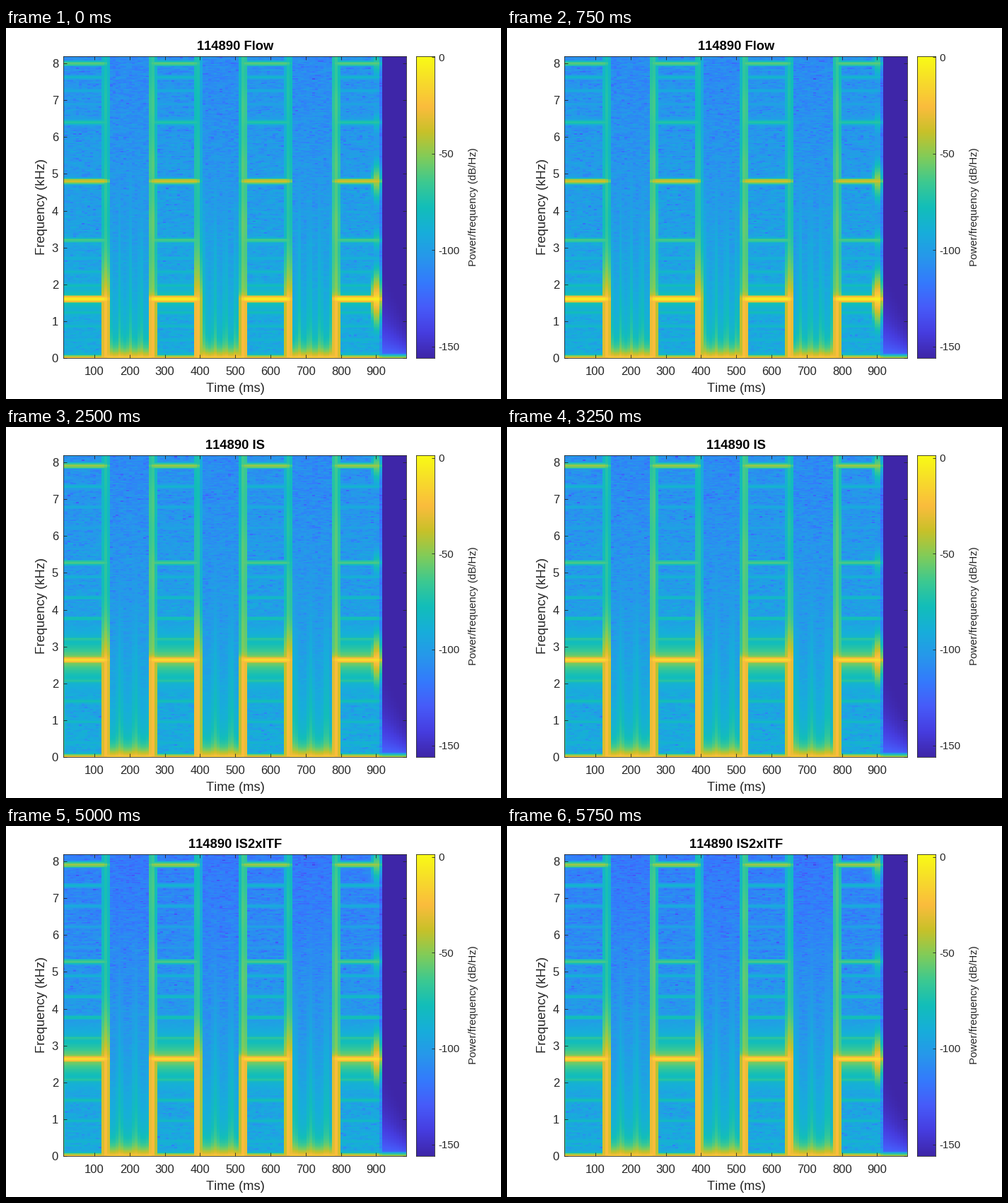
These frames come from a looping animation (700 by 525 pixels, 6250 ms). A matplotlib script:

```python
import numpy as np
import matplotlib.pyplot as plt
from matplotlib.animation import FuncAnimation
from matplotlib.colors import LinearSegmentedColormap

W, H, DPI = 700, 525, 100
INK = "#262626"
plt.rcParams.update({
    "font.family": "Liberation Sans", "text.kerning_factor": 6,
    "text.color": INK, "axes.edgecolor": INK,
    "xtick.color": INK, "ytick.color": INK, "axes.linewidth": 0.6,
})
PARULA = LinearSegmentedColormap.from_list("parula", [
    "#3e26a8", "#463de0", "#475bf9", "#347afd", "#2797eb", "#17aeda",
    "#12beb9", "#3dc990", "#81cc59", "#c8c129", "#fbbc3d", "#f7db2b",
    "#f9fb15"])

COLS, ROWS = 123, 257
FMAX, VMIN = 8.192, -156
T0, T1 = 11.6, 985.4
DT, DF = (T1 - T0) / (COLS - 1), FMAX / (ROWS - 1)
k = np.arange(COLS)[None, :]
f = np.arange(ROWS)[:, None] * DF
xpix = 81 + 485 / (COLS - 1) * k

EVENT = np.arange(6)
SWITCH = 15 + 16.3 * EVENT + 0.4 * (EVENT % 2)   # tone goes off, on, off...
LAST = 113                                       # last column with signal
HALF = 1.6                                       # half window, in columns


def power(db):
    return 10 ** (np.asarray(db) / 10)


def window(center):
    """Hamming weight of an event in each column, as power."""
    d = np.abs(k - center)
    return np.where(d < HALF, 0.54 + 0.46 * np.cos(np.pi * d / HALF), 0) ** 2


def step(d):
    return 0.5 + 0.5 * np.sin(np.pi * np.clip(d / (2 * HALF), -0.5, 0.5))


def tone_gate():
    edges = np.concatenate([[-9], SWITCH, [LAST - 0.4]])
    return sum(step(k - a) * step(b - k)
               for a, b in zip(edges[::2], edges[1::2]))


GATE = tone_gate()
GAP = (k > SWITCH[0]) & (k < SWITCH[-1]) & (GATE < 0.5)


def lobe(freq, level):
    return power(level - 6 * ((f - freq) / DF) ** 2)


def side_tones(freq, level, gap):
    return sum(lobe(freq + s * n * gap, level - 6 * n)
               for n in range(1, 5) for s in (-1, 1))


def click(main, starts, rng):
    """Flat up to the main tone, then an exponential drop and a slope."""
    x = np.maximum(f - main - 0.05, 0)
    drop, tau, slope = (29, 0.1, 2) if starts else (45, rng.uniform(.7, 1), .8)
    bead = 2 * np.sin(rng.uniform(2, 4) * x)
    return power(-25 - drop * (1 - np.exp(-x / tau)) - slope * x + bead)


def speckle(rng):
    z = rng.normal(size=(2, ROWS, COLS + 2))
    z = z[..., :-2] / 2 + z[..., 1:-1] + z[..., 2:] / 2
    return 0.8 * (10 * np.log10((z ** 2).sum(0) / 3) + 1.5)


def spectrogram(seed, main, peak, skirt, overtones, side, gap, phase, pitch,
                slope=1.7, onset=False):
    rng = np.random.default_rng(seed)
    tones = [(main, peak)] + [(main * n, lv) for n, lv in overtones]

    # noise floor, faintly banded while the tone sounds
    bands = rng.normal(0, 1.2, (ROWS, 1))
    level = -92 - slope * f + bands * GATE - 3 * (1 - GATE)
    total = power(level + speckle(rng))

    # tones with their side tones and the skirt of the loudest one
    sound = power(peak - skirt - 70 * np.sqrt(np.abs(f - main)))
    sound = sound + sum(lobe(*t) for t in tones)
    sound = sound + side_tones(main, side, gap)
    sound = sound + side_tones(tones[-1][0], -78, gap)
    total = total + sound * GATE ** 2

    # clicks where the tone toggles
    for i, c in enumerate(SWITCH):
        total = total + click(main, i % 2, rng) * window(c)

    # low rumble with striped columns between the tones
    rumble = -17 - 65 * (1 - np.exp(-f / 0.25)) - 8 * f
    stripe = np.cos(np.pi * (xpix - phase) / pitch) ** 4
    lift = 15 * (1 - np.exp(-f / 0.2)) * stripe
    total = total + GAP * power(rumble + lift) + lobe(0, -28)
    if onset:
        total = total + (k == 0) * (f < main) * power(-68)

    # flare where the signal is cut off, then the decaying tail
    for freq, lv in tones:
        total = total + power(lv - 4 - 80 * np.abs(f - freq)) * window(111.6)
    total = np.where(k == LAST, total * power(-12), total)
    reach = 0.9 - 0.06 * np.clip(k - LAST, 0, 9)
    tail = power(-120 - 38 * (1 - np.exp(-f / reach))) + lobe(0, -45)
    return 10 * np.log10(np.where(k > LAST, tail, total))


def low_tone(seed):
    return spectrogram(seed, 1.6, -4, 48,
                       [(2, -63), (3, -37), (4, -70), (5, -60)],
                       side=-71, gap=0.37, phase=161, pitch=14.9)


def high_tone(seed, phase, slope=1.7):
    return spectrogram(seed, 2.637, -11, 20, [(2, -62), (3, -47)],
                       side=-63, gap=0.5625, phase=phase, pitch=22.45,
                       slope=slope, onset=True)


SCENES = [
    ("Flow", 0.4, low_tone(1)),
    ("GT", 1.3, high_tone(2, 171)),
    ("IS", 1.3, high_tone(3, 161)),
    ("IS2", 1.3, high_tone(4, 167)),
    ("IS2xITF", 1.3, high_tone(5, 161, slope=2.7)),
]

fig = plt.figure(figsize=(W / DPI, H / DPI), dpi=DPI, facecolor="white")


def box(x0, y0, x1, y1):
    return fig.add_axes([x0 / W, 1 - y1 / H, (x1 - x0) / W, (y1 - y0) / H])


def label(x, y, text, px, **kw):
    return fig.text(x / W, 1 - y / H, text, fontsize=px * 72 / DPI,
                    ha="center", va="baseline", rotation_mode="anchor", **kw)


def picture(axes, data, extent):
    return axes.imshow(data, cmap=PARULA, origin="lower", aspect="auto",
                       interpolation="nearest", extent=extent)


ax = box(81, 40, 566, 467)
im = picture(ax, SCENES[0][2],
             (T0 - DT / 2, T1 + DT / 2, -DF / 2, FMAX + DF / 2))
ax.set(xlim=(T0, T1), ylim=(0, FMAX),
       xticks=range(100, 1000, 100), yticks=range(9))
ax.tick_params(direction="in", top=True, right=True, length=3.5, width=0.6,
               labelsize=12)
ax.tick_params(axis="x", pad=8.6)
ax.tick_params(axis="y", pad=5)

cax = box(580, 40, 606, 467)
bar = picture(cax, np.linspace(0, 1, 256)[:, None], (0, 1, VMIN, 0))
cax.set_xticks([])
cax.yaxis.tick_right()
cax.set_yticks(range(-150, 1, 50), [str(v) for v in range(-150, 1, 50)])
cax.tick_params(direction="in", length=3, width=0.6, pad=4, labelsize=10.8)

title = label(324, 31, "", 18.33, fontweight="bold", color="black")
label(324, 515, "Time (ms)", 18.33)
label(55, 253, "Frequency (kHz)", 18.33, rotation=90)
label(665, 253, "Power/frequency (dB/Hz)", 15, rotation=90)


def draw(i):
    name, vmax, data = SCENES[i]
    title.set_text("114890 " + name)
    im.set_data(data)
    im.set_clim(VMIN, vmax)
    bar.set_extent((0, 1, VMIN, vmax))
    cax.set_ylim(VMIN, vmax)
    return im, bar, title


anim = FuncAnimation(fig, draw, frames=len(SCENES), interval=1250,
                     repeat=True, repeat_delay=0, blit=False)
plt.show()
```
